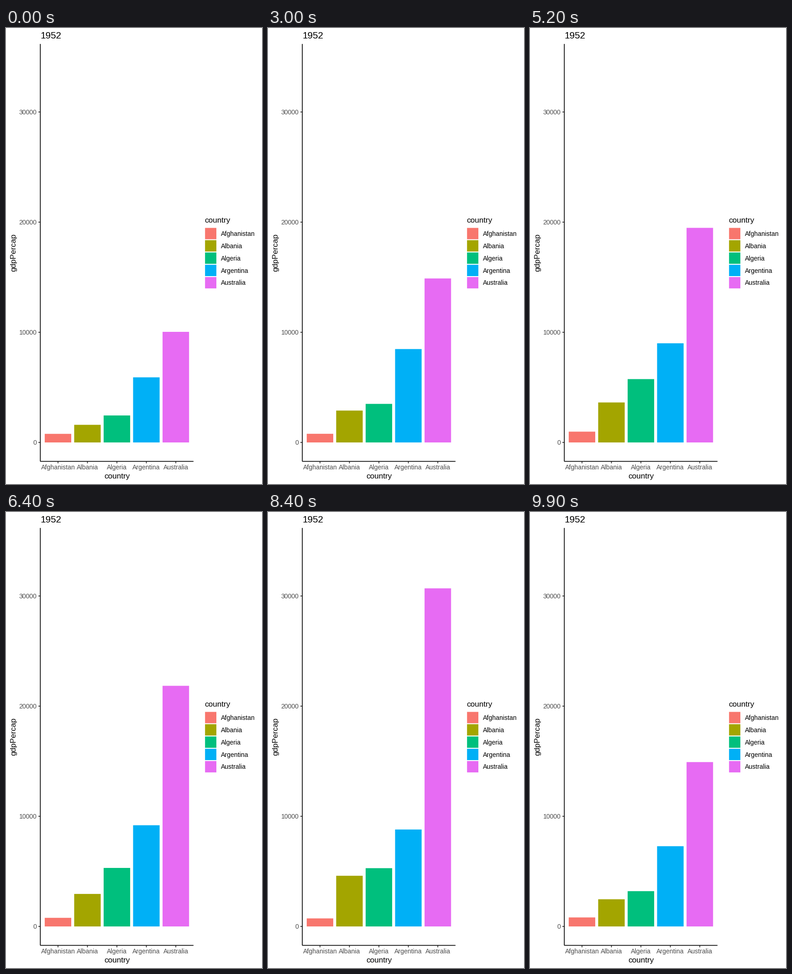
Animation, 561 px wide and 998 px high, one loop 10000 ms. Source, as a matplotlib script:

```python
import numpy as np
import matplotlib.pyplot as plt
from matplotlib.animation import FuncAnimation
from matplotlib.patches import Rectangle

W, H, DPI = 561, 998, 64
PT = 72 / DPI                      # points per pixel
FRAMES, INTERVAL = 100, 100

plt.rcParams["font.family"] = "Liberation Sans"

# thousands at a few key years; straight growth between them
KEYS = [0, 2, 4, 6, 8, 9, 10, 11]
BARS = {
    "Afghanistan": ("#F8766D", [.78, .85, .74, .98, .65, .64, .73, .97]),
    "Albania": ("#A3A500", [1.6, 2.31, 3.31, 3.63, 2.5, 3.19, 4.6, 5.94]),
    "Algeria": ("#00BF7D", [2.45, 2.55, 4.18, 5.75, 5.02, 4.8, 5.29, 6.22]),
    "Argentina": ("#00B0F6", [5.91, 7.13, 9.44, 9, 9.31, 10.97, 8.8, 12.78]),
    "Australia": ("#E76BF3", [10.04, 12.22, 16.79, 19.48, 23.42, 27, 30.69, 34.44]),
}
YEARS = KEYS[-1] + 1

# pixel layout
ZERO, SCALE = 907.05, 0.02411
LEFT, TOP, BOTTOM = 75.2, 34.9, 948.5
UNIT = 64.55
RIGHT = LEFT + 5.2 * UNIT
TICK, LINE = 4.3, 1.66
SMALL, MEDIUM, LARGE = 14, 17.1, 20.6

# each change takes 6 frames in the first five years, then 5
year = np.arange(YEARS)
STEPS = np.where(year < 5, 6, 5)
STARTS = 3 + 8 * year + np.minimum(year, 5)

fig = plt.figure(figsize=(W / DPI, H / DPI), dpi=DPI, facecolor="white")
ax = fig.add_axes([0, 0, 1, 1])
ax.set_xlim(0, W)
ax.set_ylim(H, 0)
ax.axis("off")


def label(x, y, text, size, color="black", **kw):
    ax.text(x, y, text, fontsize=size * PT, color=color, va="baseline", **kw)


def line(xs, ys, color="black"):
    ax.plot(xs, ys, color=color, lw=LINE * PT, solid_capstyle="butt", snap=False)


def box(x, y, width, height, color):
    return ax.add_patch(Rectangle((x, y), width, height, fc=color, ec="none",
                                  lw=0, snap=False))


def y_of(value):
    return ZERO - SCALE * value


def center(i):
    return LEFT + UNIT * (i + 0.6)


def draw_axes():
    for value in range(0, 30001, 10000):
        y = y_of(value)
        line([LEFT - TICK, LEFT], [y, y], "#333333")
        label(67.3, round(y + 5), str(value), SMALL, "#4D4D4D", ha="right")
    for i, name in enumerate(BARS):
        x = center(i)
        line([x, x], [BOTTOM, BOTTOM + TICK], "#333333")
        label(x, 966, name, SMALL, "#4D4D4D", ha="center")
    line([LEFT, LEFT], [TOP, BOTTOM])
    line([LEFT, RIGHT], [BOTTOM, BOTTOM])
    label(75, 23, "1952", LARGE)
    label((LEFT + RIGHT) / 2, 986, "country", MEDIUM, ha="center")
    label(21, (TOP + BOTTOM) / 2, "gdpPercap", MEDIUM, ha="center",
          rotation=90, rotation_mode="anchor")


def draw_legend():
    label(435.3, 426, "country", MEDIUM)
    for i, (name, (color, _)) in enumerate(BARS.items()):
        y = 449.9 + 26.9 * i
        box(436.2, y - 12.4, 24.8, 24.8, color)
        label(471, round(y + 5), name, SMALL)


def make_bars():
    width = 0.9 * UNIT
    return [box(center(i) - width / 2, ZERO, width, 0, color)
            for i, (color, _) in enumerate(BARS.values())]


draw_axes()
draw_legend()
bars = make_bars()
# yearly heights, closed back to the first year
levels = [1000 * np.interp(np.arange(YEARS + 1) % YEARS, KEYS, keys)
          for _, keys in BARS.values()]


def update(frame):
    pos = np.clip((frame - STARTS + 1) / STEPS, 0, 1).sum()
    for bar, level in zip(bars, levels):
        top = y_of(np.interp(pos, np.arange(YEARS + 1), level))
        bar.set_y(top)
        bar.set_height(ZERO - top)
    return bars


def init():
    return update(0)


anim = FuncAnimation(fig, update, frames=FRAMES, init_func=init,
                     interval=INTERVAL, repeat=True, repeat_delay=0, blit=False)
plt.show()
```
